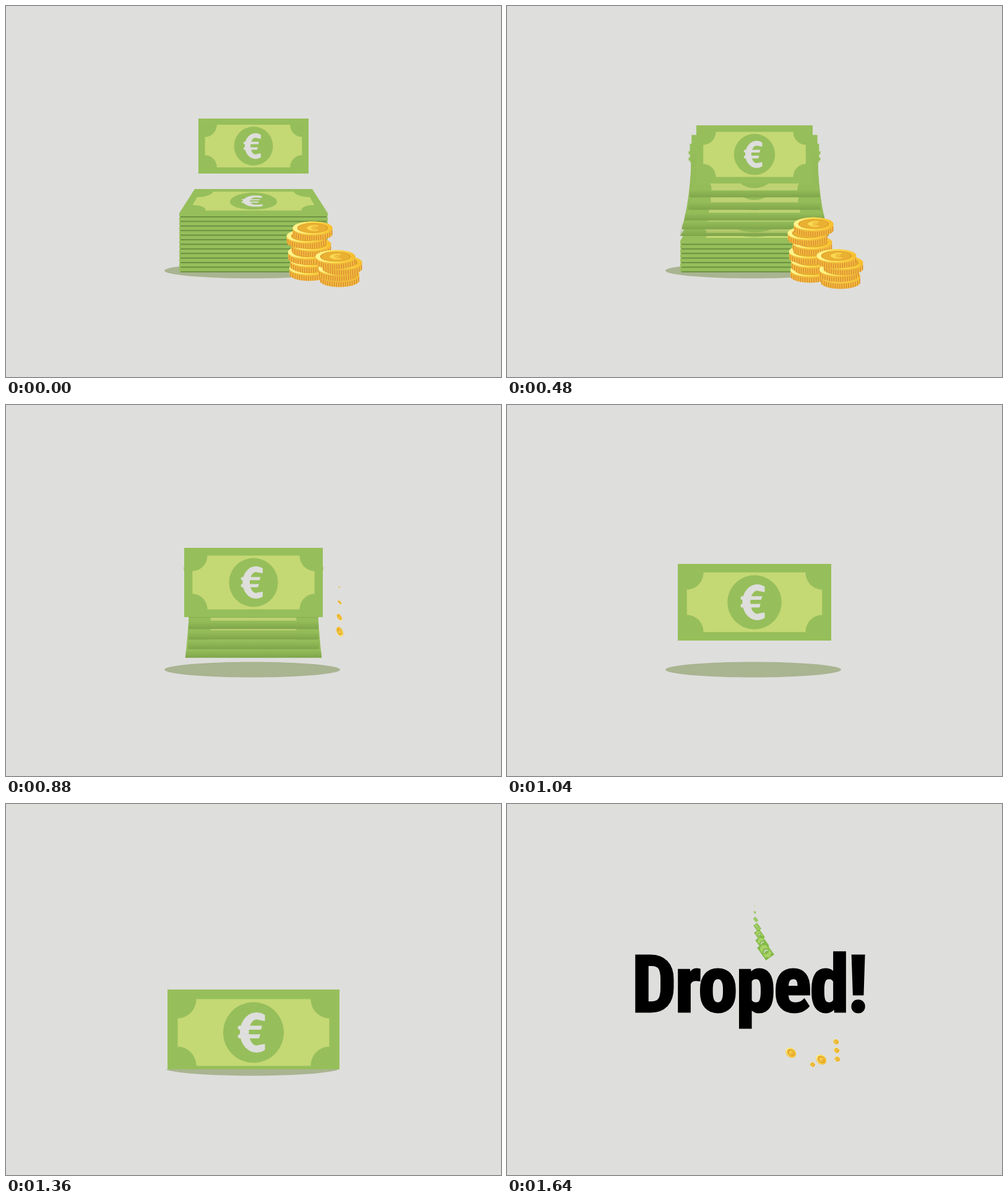
An HTML page with a canvas for the animation above (1.68 s loop, 800 by 600 pixels).

```html
<!DOCTYPE html>
<html lang="en">
<head>
<meta charset="utf-8">
<style>
html, body { margin: 0; width: 100%; height: 100%; overflow: hidden; background: #dededc; }
canvas { display: block; }
</style>
</head>
<body>
<canvas id="stage" width="800" height="600"></canvas>
<script>
const ctx = document.getElementById('stage').getContext('2d');
const LOOP = 1680, STEP = 40, CX = 400, GROUND = 429, NOTES = 13;
const BG = '#dededc', GREEN = '#96bf5b', LIME = '#c4d874', SHADE = '#6d9142';

const clamp = v => Math.max(0, Math.min(1, v));
const lerp = (a, b, p) => a + (b - a) * p;
const range = (n, f) => Array.from({ length: n }, (_, i) => f(i));
const arc = (x, y, rx, ry, from, to, n = 24) => range(n + 1, i => {
  const a = lerp(from, to, i / n) * Math.PI / 180;
  return [x + rx * Math.cos(a), y + ry * Math.sin(a)];
});
const bar = (y, right) => [[-22, y], [right, y], [right - 2, y + 6.5], [-22, y + 6.5], [-23.5, y + 3.2]];

// Banknote shapes on a 278 x 139 sheet centred on the origin
const EURO = [
  [...arc(7, 0, 27, 32.5, -60, -300, 40), [20.5, 18.5], ...arc(7, 0, 12.5, 21, 75, 285, 30), [20.5, -18.5]],
  bar(-11, 16),
  bar(3, 13)
];
const SHEET = range(42, i => i < 21 ? [-139, 69.5 - i * 6.95] : [139, -69.5 + (i - 21) * 6.95]);
const PANEL = [[-1, -1, 90], [1, -1, 180], [1, 1, 270], [-1, 1, 0]]
  .flatMap(([sx, sy, a]) => arc(sx * 122.5, sy * 54, 30, 31, a, a - 90));
const DISC = arc(0, 0, 49, 49, 0, 360, 60);

function fill(points, color, map = (x, y) => [x, y]) {
  ctx.beginPath();
  points.forEach(p => ctx.lineTo(...map(...p)));
  ctx.closePath();
  ctx.fillStyle = color;
  ctx.fill();
}

function note(map, dark = GREEN, light = LIME) {
  fill(SHEET, dark, map);
  fill(PANEL, light, map);
  fill(DISC, dark, map);
  EURO.forEach(part => fill(part, BG, (x, y) => map(x - 2, y)));
}

// Maps the sheet to a trapezoid whose sides bend by the given power
const sheetMap = (topHalf, top, baseHalf, base, bend = 1) => (x, y) => {
  const v = clamp((y + 69.5) / 139);
  return [CX + x / 139 * lerp(topHalf, baseHalf, v ** bend), lerp(top, base, v)];
};

function frontNote(t) {
  const u = Math.min(1, t / 1200) ** 2.5;
  return {
    half: Math.round(89 + 50 * u),
    top: Math.round(182 + 107 * u),
    base: Math.round(271 + 157 * u)
  };
}

function lyingNote(base) {
  note(sheetMap(95, base - 39, 120, base));
  ctx.fillStyle = GREEN;
  ctx.beginPath();
  ctx.roundRect(280, base - 1, 240, 7.5, 2.5);
  ctx.fill();
  ctx.fillStyle = SHADE;
  ctx.fillRect(282, base + 5, 236, 2);
}

function risingNote(t, age, rest, front) {
  const rise = 31 * (age / 200) ** 1.6;
  const base = rest - rise;
  const below = base - front.base;
  if (below <= 0) return;
  const stand = clamp(age / 40), spread = clamp((t - 320) / 320);
  const top = lerp(rest - 39, front.top + below * lerp(0.93, 0.47, spread), stand);
  const capHalf = 99 + spread * (15 - 13 * clamp((age - 115) / 120));
  const baseHalf = Math.max(105, 120 - rise * 0.65);
  const bodyHalf = lerp(95, Math.min(capHalf, 102), stand);
  note(sheetMap(bodyHalf, top, baseHalf, base, 1 + stand), '#94bc59', '#bed273');
  if (stand === 1) {
    ctx.fillStyle = GREEN;
    ctx.fillRect(CX - capHalf, top, capHalf * 2, age > 140 ? 30 : 5);
  }
  const fade = ctx.createLinearGradient(0, base - 12, 0, base);
  fade.addColorStop(0, 'rgba(95,130,50,0)');
  fade.addColorStop(1, 'rgba(95,130,50,.4)');
  ctx.fillStyle = fade;
  ctx.fillRect(CX - baseHalf, base - 12, baseHalf * 2, 12);
}

function stack(t, front) {
  for (let k = NOTES - 1; k >= 0; k--) {
    const rest = 335 + 7.4 * k;
    const age = t - (215 + 58 * k - 1.1 * k * k);
    if (age <= 0) lyingNote(rest);
    else risingNote(t, age, rest, front);
  }
}

function coin(x, y, rx, ry, angle = 0, thick = 10) {
  ctx.save();
  ctx.translate(x, y);
  ctx.rotate(angle);
  ctx.beginPath();
  ctx.ellipse(0, 0, rx, ry, 0, Math.PI, 0);
  ctx.lineTo(rx, thick);
  ctx.ellipse(0, thick, rx, ry, 0, 0, Math.PI);
  ctx.closePath();
  ctx.fillStyle = '#f1bd3c';
  ctx.fill();
  if (rx > 12) {
    ctx.strokeStyle = '#d98232';
    ctx.lineWidth = 1.2;
    ctx.beginPath();
    for (let e = -rx + 2; e < rx; e += 3.6) {
      const edge = ry * Math.sqrt(1 - (e / rx) ** 2);
      ctx.moveTo(e, edge + 2);
      ctx.lineTo(e, edge + thick);
    }
    ctx.stroke();
  }
  const rim = ctx.createLinearGradient(-rx, 0, rx, 0);
  rim.addColorStop(0, '#fff796');
  rim.addColorStop(0.45, '#fde255');
  rim.addColorStop(1, '#f7bd2d');
  const disc = (scale, color) => fill(arc(0, 0, rx * scale, ry * scale, 0, 360, 40), color);
  disc(1, rim);
  disc(0.77, '#d99827');
  disc(0.72, '#e9b032');
  EURO.forEach(part => fill(part, '#fbd953', (px, py) => [px * rx / 75, py * ry / 75]));
  ctx.restore();
}

// Coins leave from the top: they tip over, shrink and fly up
function coinPile(t, { x, y, count, gap, sway, launch }) {
  const settle = Math.min(1, t / 640) ** 3.5;
  for (let i = 0; i < count; i++) {
    const p = clamp((t - launch(count - 1 - i)) / 250);
    if (p === 1) continue;
    const side = i % 2 ? sway : -sway;
    const slot = y + 8 * settle - i * gap * (1 + 0.4 * settle);
    const size = 1 - p ** 1.5, rx = 32 * size;
    coin(x + side * i * (1 - p), slot - 115 * p ** 2.2,
      rx, rx * (0.33 + 0.35 * Math.sin(Math.PI * p)),
      -2.6 * p ** 1.4, 10 * size * (1 - 0.6 * p));
  }
}

const TALL = { x: 490, y: 424, count: 6, gap: 13, sway: 1.1, launch: n => 490 + 55 * n - 5 * n * n };
const SHORT = { x: 539, y: 434, count: 4, gap: 9.6, sway: -2.2, launch: n => 638 + 12 * n };

function shadow(shift) {
  ctx.save();
  if (shift) {
    ctx.beginPath();
    ctx.rect(0, GROUND, 800, 100);
    ctx.clip();
  }
  fill(arc(398, 428 - 13 * shift, 142, 12.5, 0, 360, 90), '#a9b491');
  ctx.restore();
}

function sinkingNote(t) {
  const u = clamp((t - 1200) / 440) ** 2.5;
  const front = frontNote(t), drop = Math.round(139 * u);
  shadow(u);
  ctx.save();
  ctx.beginPath();
  ctx.rect(0, 0, 800, GROUND);
  ctx.clip();
  note(sheetMap(front.half, front.top + drop, front.half, front.base + drop));
  ctx.restore();
}

function fallingNotes(grown) {
  const reach = lerp(0.62, 1, grown), count = Math.round(lerp(2, 7, grown));
  for (let i = 7 - count; i < 7; i++) {
    const p = i / 6 * reach;
    const w = 1 + 24 * p ** 1.2, h = w * lerp(0.35, 0.65, grown);
    ctx.save();
    ctx.translate(400 + 18 * p * p, 165 + 73 * p ** 1.1);
    ctx.rotate(0.95 * grown);
    note((x, y) => [x * w / 278, y * h / 139], '#7fb843', '#a9d267');
    ctx.restore();
  }
}

function coinRow(p, x0, y0, x1, y1, count, r) {
  for (let i = 0; i < count; i++) {
    const q = i / Math.max(1, count - 1);
    coin(lerp(549, lerp(x0, x1, q), p), lerp(423, lerp(y0, y1, q), p), r * p, r * p * 0.75, 0.7, p);
  }
}

function spilledCoins(p) {
  coinRow(p, 459, 402, 508, 413, 2, 9);
  coinRow(p, 532, 384, 534, 412, 3, 4.5);
  coinRow(p, 494, 421, 494, 421, 1, 4);
}

function headline() {
  const word = 'Droped!', left = 208, width = 370;
  const setSize = size => {
    ctx.font = `900 extra-condensed ${size}px "Roboto Condensed", Roboto, sans-serif`;
    ctx.letterSpacing = `${-0.02 * size}px`;
    return ctx.measureText(word);
  };
  const unit = setSize(100);
  const size = Math.min(128, 100 * width / (unit.actualBoundingBoxLeft + unit.actualBoundingBoxRight));
  const box = setSize(size);
  const ink = box.actualBoundingBoxLeft + box.actualBoundingBoxRight;
  const x = left + (width - ink) / 2 + box.actualBoundingBoxLeft;
  ctx.fillStyle = ctx.strokeStyle = '#000';
  ctx.lineWidth = 3;
  ctx.fillText(word, x, 336);
  ctx.strokeText(word, x, 336);
}

function draw(t) {
  ctx.fillStyle = BG;
  ctx.fillRect(0, 0, 800, 600);
  if (t < 1200) {
    const front = frontNote(t);
    shadow(0);
    stack(t, front);
    coinPile(t, TALL);
    coinPile(t, SHORT);
    note(sheetMap(front.half, front.top, front.half, front.base));
    return;
  }
  if (t < 1640) sinkingNote(t);
  else headline();
  if (t >= 1520) {
    fallingNotes((t - 1520) / 120);
    spilledCoins((t - 1510) / 130);
  }
}

const start = performance.now();
function tick() {
  const t = Math.floor((performance.now() - start) % LOOP / STEP) * STEP;
  draw(t < 80 ? 0 : t);
  requestAnimationFrame(tick);
}
tick();
</script>
</body>
</html>
```
